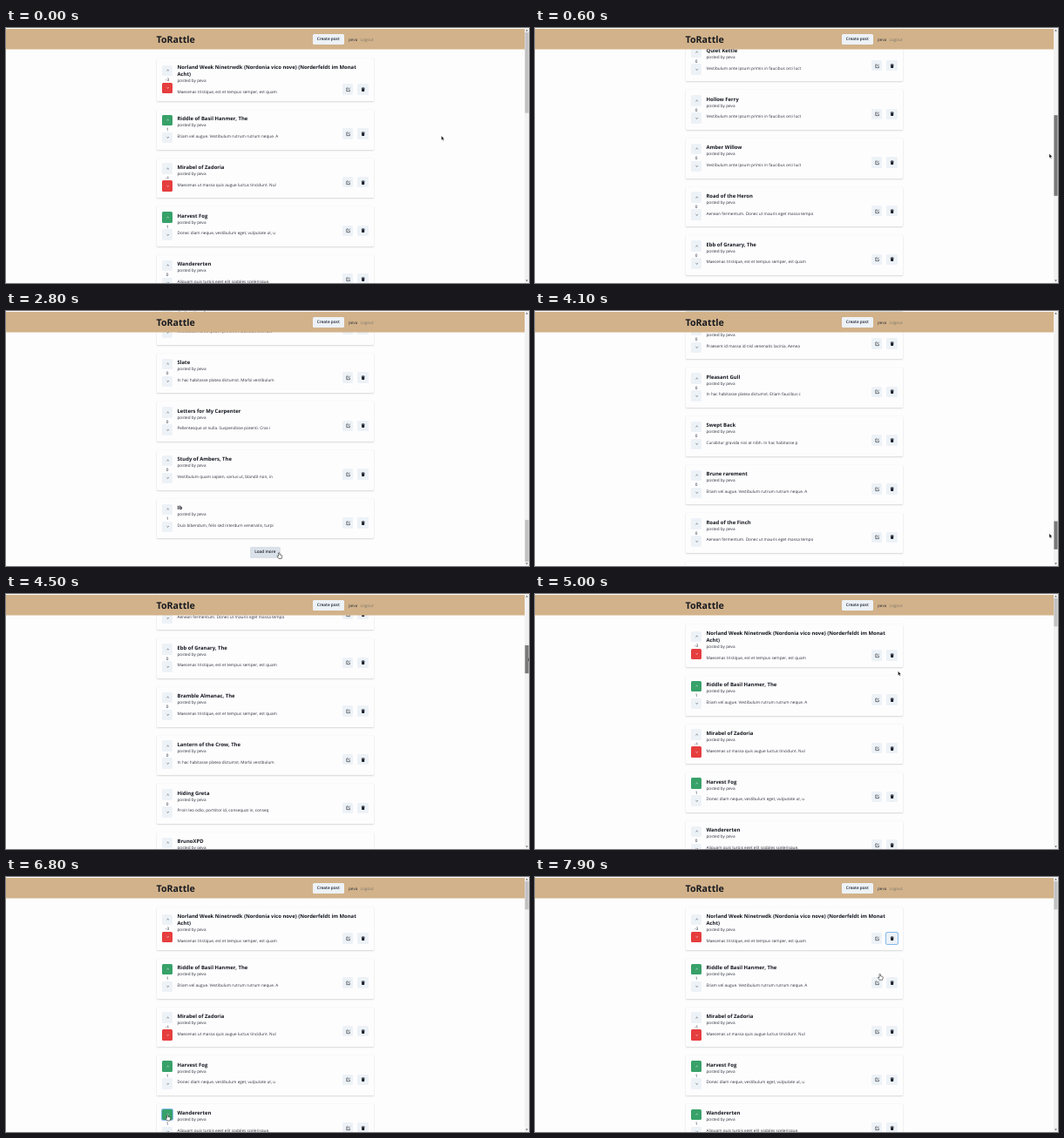
An HTML page for the animation above (8000 ms loop, 600 by 293 pixels).

```html
<!DOCTYPE html>
<html lang="en">
<head>
<meta charset="utf-8">
<title>ToRattle</title>
<style>
html, body { margin: 0; width: 100%; height: 100%; overflow: hidden; background: #fefdfe; }
body { position: relative; font: 4.7px/6px "Open Sans", "Noto Sans", sans-serif; color: #2b303a; text-rendering: geometricPrecision; white-space: nowrap; }
body *, svg { position: absolute; }
svg * { position: static; }
#page { left: 0; top: 0; width: 600px; }
.card { left: 172.8px; width: 249.6px; background: #fefdfe; border-radius: 1px; box-shadow: 0 1px 2px rgba(0,0,0,.14), 0 0 1px rgba(0,0,0,.13); }
.card b { left: 23.7px; font-size: 5.9px; line-height: 7.8px; color: #14181f; }
.card span { left: 23.7px; }
.card i { left: 6px; width: 12.5px; text-align: center; font-style: normal; color: #1a202c; }
.btn { width: 12.5px; height: 12.5px; border-radius: 1.5px; background: #edf2f7; color: #1a202c; }
.btn svg { left: .6px; top: .6px; width: 11.3px; height: 11.3px; }
.up { background: #38a169; color: #fff; }
.down { background: #e53e3e; color: #fff; }
.up.pressed { background: #22704a; }
.ring { box-shadow: 0 0 0 1px rgba(66,153,225,.65); }
.wide { font-weight: 600; text-align: center; line-height: 12.8px; }
#more { left: 280px; width: 34.5px; }
#more.hover { background: #dae1e8; }
#more.busy { background: #f5f7fa; }
header { left: 0; top: 1px; width: 595px; height: 23px; background: #d2b28a; box-shadow: 0 1px rgba(210,178,138,.5); }
header b { left: 172.5px; top: 5.5px; font-size: 10.7px; line-height: 15px; color: #171a20; }
#over { left: 0; top: 0; }
</style>
</head>
<body>
<div id="page"><div id="more" class="btn wide"></div></div>
<header>
  <b>ToRattle</b>
  <div class="btn wide" style="left:352px;top:5.6px;width:35.5px">Create post</div>
  <span style="left:393px;top:9.6px">peva</span>
  <span style="left:406.5px;top:9.6px;color:#7d786e">Logout</span>
</header>
<svg id="over" width="600" height="293">
  <path d="M595 0H600V293H595Z" fill="#f1f1f1"/>
  <path d="M596.2 3.4 597.5 1.8 598.8 3.4ZM596.2 289.6 597.5 291.2 598.8 289.6Z" fill="#555"/>
  <rect id="thumb" x="595.4" width="4.2"/>
  <g id="spin" fill="none" stroke="#777" stroke-width=".6"><circle r="2.3" stroke-dasharray="9 5.45"/></g>
  <path id="arrow" d="M0 0V4.8L1.1 3.8 1.9 5.5 2.6 5.2 1.9 3.5H3.3Z" fill="#111" stroke="#fff" stroke-width=".2"/>
  <path id="hand" d="M-.7 .5Q0-.5 .7 .5V2.5L3 3Q3.7 3.2 3.5 4.2L2.9 7H-.4L-2.3 4.3Q-2.2 3.3-.7 4.3Z" fill="#fff" stroke="#222" stroke-width=".6"/>
</svg>
<script>
const $ = id => document.getElementById(id);
const LOOP = 8000, VIEW = 293, PITCH = 55.67, PER_LOAD = 15;

// Runs of posts, keyed by the place of their first one: title | text | score
const runs = {
  0: `Norland Week Ninetrwdk (Nordonia vico nove) (Norderfeldt im Monat<br>Acht)|Maecenas tristique, est et tempus semper, est quam|-3
Riddle of Basil Hanmer, The|Etiam vel augue. Vestibulum rutrum rutrum neque. A|1
Mirabel of Zadoria|Maecenas ut massa quis augue luctus tincidunt. Nul|-1
Harvest Fog|Donec diam neque, vestibulum eget, vulputate ut, u|1
Wandererten|Aliquam quis turpis eget elit sodales scelerisque.`,
  8: `Road of the Heron|Aenean fermentum. Donec ut mauris eget massa tempo
Ebb of Granary, The|Maecenas tristique, est et tempus semper, est quam
Bramble Almanac, The|Maecenas tristique, est et tempus semper, est quam
Lantern of the Crow, The|In hac habitasse platea dictumst. Morbi vestibulum
Hiding Greta|Proin leo odio, porttitor id, consequat in, conseq
BrunoXPD|Curabitur in libero ut massa volutpat convallis. M
Hurry, My Dove|Maecenas leo odio, condimentum id, luctus nec, mol`,
  26: `Slate|In hac habitasse platea dictumst. Morbi vestibulum
Letters for My Carpenter|Pellentesque at nulla. Suspendisse potenti. Cras i
Study of Ambers, The|Vestibulum quam sapien, varius ut, blandit non, in
Ib|Duis bibendum, felis sed interdum venenatis, turpi|1`,
  38: `Copper Meadow|Praesent id massa id nisl venenatis lacinia. Aenea
Pleasant Gull|In hac habitasse platea dictumst. Etiam faucibus c
Swept Back|Curabitur gravida nisi at nibh. In hac habitasse p
Brune rarement|Etiam vel augue. Vestibulum rutrum rutrum neque. A
Road of the Finch|Aenean fermentum. Donec ut mauris eget massa tempo`
};
const first = ["Quiet", "Hollow", "Amber", "Distant", "Paper"];
const second = ["Orchard", "Kettle", "Ferry", "Willow"];
const posts = Array.from({ length: 3 * PER_LOAD }, (_, i) =>
  [`${first[i % 5]} ${second[i % 4]}`, "Vestibulum ante ipsum primis in faucibus orci luct"]);
for (const start in runs)
  runs[start].split("\n").forEach((row, k) => posts[+start + k] = row.split("|"));

const stroke = d => `<path d="${d}" fill="none" stroke="currentColor" stroke-width=".65"/>`;
const icons = {
  up: stroke("M5 6.8 6.25 5.7 7.5 6.8"),
  down: stroke("M5 5.8 6.25 6.9 7.5 5.8"),
  edit: stroke("M6.4 4.4H4.2V8.5H8.2V6.4M5.8 6.9 8.5 4.1"),
  trash: `<path d="M4.1 4.2H5.4L5.7 3.7H6.8L7.1 4.2H8.4V4.9H4.1ZM4.4 5.2H8.1L7.8 8.8H4.7Z" fill="currentColor"/>`
};
const button = (icon, x, mid, cls = "") =>
  `<div class="btn ${cls}" data-b="${icon}" style="left:${x}px;top:${mid - 6.25}px"><svg viewBox="0 0 12.5 12.5">${icons[icon]}</svg></div>`;
const line = (tag, mid, h, text) => `<${tag} style="top:${mid - h / 2}px">${text}</${tag}>`;

const cardTop = i => i ? 94 + (i - 1) * PITCH : 35;
const pageHeight = n => cardTop(n - 1) + 77.5;
const cards = posts.map(([title, text, score = 0], i) => {
  const grow = i ? 0 : 8, mid = i ? 22 : 24;
  const vote = i > 3 ? "" : score > 0 ? "up" : "down";
  const card = document.createElement("div");
  card.className = "card";
  card.style.cssText = `top:${cardTop(i)}px;height:${i ? 45.5 : 48.5}px`;
  card.innerHTML = line("b", 11.2, 7.8, title) +
    line("span", 18.3 + grow, 6, "posted by peva") +
    line("span", 30.9 + grow, 6, text) +
    line("i", mid + 1.2, 6, score) +
    button("up", 6.2, mid - 10, vote === "up" ? vote : "") +
    button("down", 6.2, mid + 10, vote === "down" ? vote : "") +
    button("edit", 213.2, 27.5 + grow) +
    button("trash", 230.6, 27.5 + grow);
  $("page").append(card);
  return card;
});
const part = (i, name) => cards[i].querySelector(`[data-b=${name}]`);

const within = (t, a, b) => t >= a && t < b;
const ramp = (t, a, b) => Math.min(1, Math.max(0, (t - a) / (b - a)));
const show = (el, on) => el.style.display = on ? "" : "none";

const loads = [{ click: 1500, done: 1900 }, { click: 2900, done: 3700 }];
const bottom = loaded => pageHeight(loaded * PER_LOAD) - VIEW;
// Three drags to the bottom, then one back to the top
function scrollAt(t) {
  const down = [400, 2000, 3700].reduce((sum, start, k) =>
    sum + (bottom(k + 1) - (k ? bottom(k) : 0)) * ramp(t, start, start + (k < 2 ? 400 : 300)), 0);
  return down * (1 - ramp(t, 4069, 4618));
}

// Places the pointer visits; each gives its position at the moment of drawing
let thumbMid = 0;
const spot = (x, y) => ({ pos: () => [x, y] });
const onThumb = x => ({ drags: true, pos: () => [x, thumbMid - 2] });
const over = (el, dx = 0) => ({
  presses: true,
  pos: () => {
    const r = el.getBoundingClientRect();
    return [r.x + r.width / 2 + dx, r.y + r.height / 2];
  }
});
const grab = onThumb(590), pastEdge = onThumb(604), onMore = over($("more"), 16);

// Buttons clicked in turn: arrive, click after 100 ms, leave after 300
const clicked = [part(2, "down"), part(3, "up"), part(4, "up"), part(0, "trash")];
const arrival = k => 5400 + 600 * k;
const stops = [
  [0, spot(499.5, 124)], [400, grab], [900, grab], [1300, onMore], [1500, onMore],
  [1700, spot(580.5, 193.5)], [2000, grab], [2400, grab], [2700, onMore], [2900, onMore],
  [3700, grab], [4100, grab], [4400, pastEdge], [4700, grab],
  ...clicked.flatMap((el, k) => [[arrival(k), over(el)], [arrival(k) + 300, over(el)]]),
  [LOOP, over(part(1, "edit"))]
];

function draw(t) {
  const count = PER_LOAD * (1 + loads.filter(l => l.done <= t).length);
  const height = pageHeight(count), scroll = scrollAt(t);
  cards.forEach((card, i) => show(card, i < count));
  $("page").style.transform = `translateY(${-Math.round(scroll)}px)`;

  const busy = loads.some(l => within(t, l.click, l.done));
  const hover = loads.some(l => within(t, l.click - 200, l.click));
  $("more").style.top = height - 22 + "px";
  $("more").textContent = busy ? "" : "Load more";
  $("more").className = "btn wide" + (busy ? " busy" : hover ? " hover" : "");
  show($("spin"), busy);
  $("spin").setAttribute("transform", `translate(297.2 ${height - 15.7 - scroll}) rotate(${t * .8 + 60})`);

  clicked.forEach((el, k) => {
    const click = arrival(k) + 100;
    el.classList.toggle("ring", within(t, click, k < 3 ? click + 600 : LOOP));
    el.classList.toggle("pressed", within(t, click - 100, click));
  });
  const voted = t >= arrival(2) + 100;
  part(4, "up").classList.toggle("up", voted);
  cards[4].querySelector("i").textContent = +voted;

  const next = stops.findIndex(s => s[0] > t);
  const [t0, from] = stops[next - 1], [t1, to] = stops[next];
  const track = VIEW - 10, size = VIEW / height * track, y = 5 + scroll / height * track;
  thumbMid = y + size / 2;
  $("thumb").setAttribute("y", y);
  $("thumb").setAttribute("height", size);
  $("thumb").setAttribute("fill", from.drags && to.drags ? "#787878" : "#c1c1c1");

  const a = from.pos(), b = to.pos(), f = ramp(t, t0, t1);
  const hand = !!(from.presses && to.presses);
  show($("hand"), hand);
  show($("arrow"), !hand);
  $(hand ? "hand" : "arrow").setAttribute("transform",
    `translate(${a[0] + (b[0] - a[0]) * f} ${a[1] + (b[1] - a[1]) * f})`);
}

const start = performance.now();
function tick() {
  const t = (performance.now() - start) % LOOP;
  draw(Math.floor(t / 100) * 100);
  requestAnimationFrame(tick);
}
tick();
</script>
</body>
</html>
```
